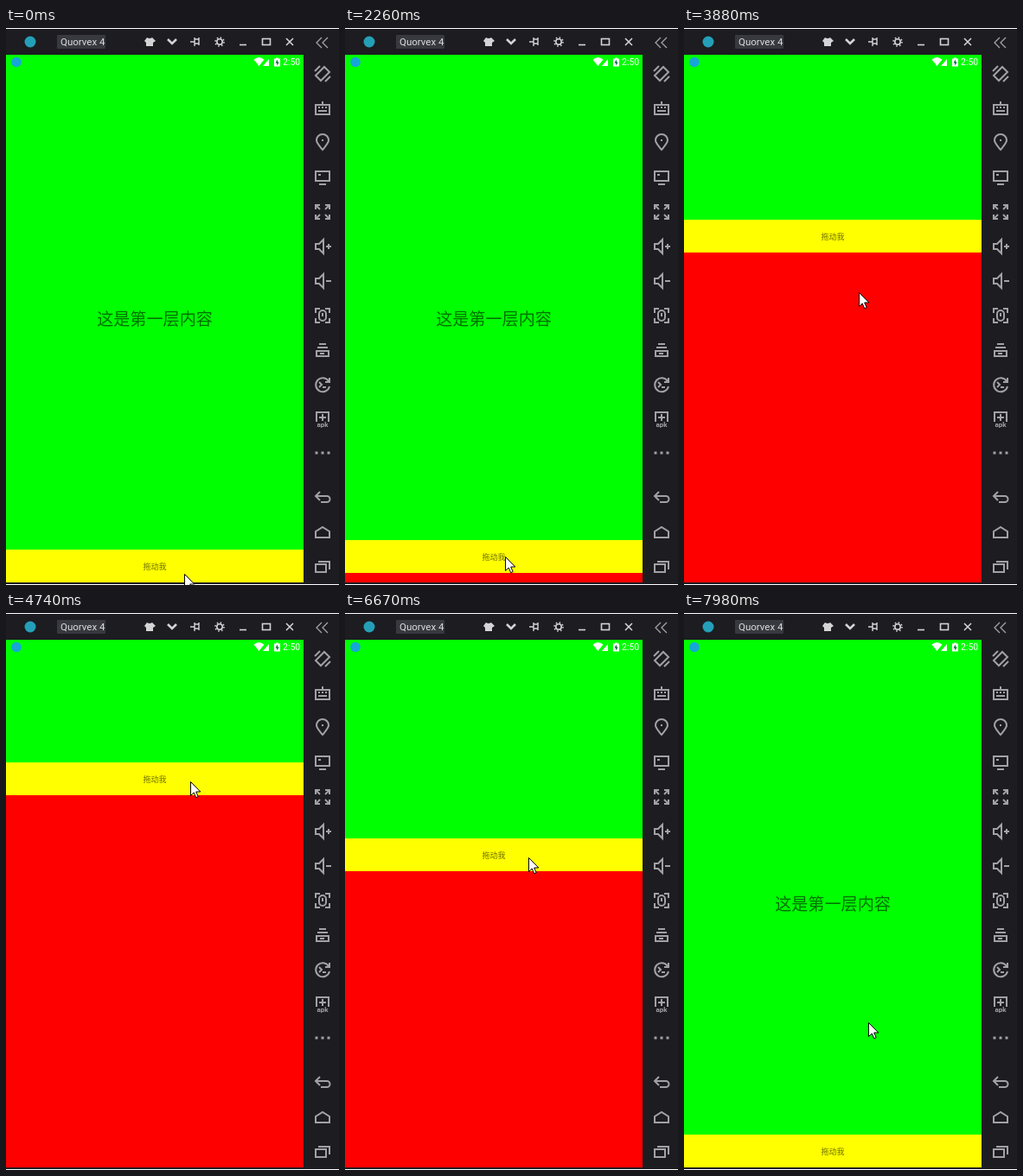
Write an HTML page that moves like this. It is 385 by 645 pixels and loops after 8 s.

```html
<!DOCTYPE html>
<html lang="zh-CN">
<head>
<meta charset="utf-8">
<style>
html, body { margin: 0; width: 100%; height: 100%; overflow: hidden; background: #fff; }
svg { display: block; }
.zh { font-family: "Noto Sans CJK SC", "Noto Sans CJK", sans-serif; fill: #000; fill-opacity: .56; text-anchor: middle; }
.ui { font-family: Roboto, sans-serif; }
.line { fill: none; stroke: #a2a2a6; stroke-width: 2; }
.title { fill: none; stroke: #d4d4d6; stroke-width: 1.6; }
</style>
</head>
<body>
<svg width="385" height="645" viewBox="0 0 385 645">
  <rect y="1" width="385" height="643" fill="#1c1c21"/>

  <circle cx="28" cy="16" r="6.5" fill="#259fb8"/>
  <rect x="59" y="8" width="56" height="16" rx="1" fill="#38393f"/>
  <text class="ui" x="63" y="20" font-size="11.5" fill="#dcdcde">Quorvex 4</text>
  <g class="title">
    <path fill="#d4d4d6" stroke="none" d="M163 11q3 2 6 0l4 4-3 2v4h-8v-4l-2-2z"/>
    <path stroke-width="2.6" d="M187 13l5 5 5-5"/>
    <path stroke-width="1.4" d="M213 16h5m0-5v10m0-8h5v5h-5m5-7v9"/>
    <circle cx="247" cy="16" r="3.2"/>
    <circle cx="247" cy="16" r="5" stroke-dasharray="1.6 2.327"/>
    <path d="M270 19.5h8"/>
    <rect x="296.500" y="12.500" width="9" height="7"/>
    <path d="M324 12l8 8m0-8l-8 8"/>
    <path stroke="#a2a2a6" stroke-width="1.3" d="M365 11l-6 6 6 6m7-12l-6 6 6 6"/>
  </g>

  <defs>
    <path id="speaker" d="M-8-3h4l5-5v16l-5-5h-4zM4 0h6"/>
    <path id="corner" d="M-8-3v-5h5"/>
    <g id="corners">
      <use href="#corner"/>
      <use href="#corner" transform="rotate(90)"/>
      <use href="#corner" transform="rotate(180)"/>
      <use href="#corner" transform="rotate(270)"/>
    </g>
  </defs>
  <g class="line" transform="translate(366)">
    <path transform="translate(0 53)" d="M2-8l6 6L-2 8l-6-6zM-9-3l6-6M3 9l6-6"/>
    <path transform="translate(0 93)" d="M-8-4H8V7H-8zM0-4v-4M-5 3H5"/>
    <path transform="translate(0 93)" stroke-dasharray="2" d="M-5-1H5"/>
    <path transform="translate(0 132)" d="M0 9C-4 4-7 1-7-2a7 7 0 0 1 14 0C7 1 4 4 0 9zM-1-2h2"/>
    <path transform="translate(0 173)" d="M-8-7H8V4H-8zM-4 8h8M-5-3h3"/>
    <use href="#corners" y="213"/>
    <path transform="translate(0 213)" stroke-dasharray="7 8.500" d="M-8-8L8 8M8-8L-8 8"/>
    <use href="#speaker" y="253"/>
    <path d="M7 250v6"/>
    <use href="#speaker" y="293"/>
    <use href="#corners" y="333"/>
    <rect x="-4" y="327" width="8" height="12" rx="4"/>
    <path d="M0 330v4"/>
    <path transform="translate(0 373)" d="M-4-7h8M-6-3H6M-7 1H7v6H-7zM-3 4h5"/>
    <path transform="translate(0 413)" d="M7-4a8 8 0 1 0 1 6M8-8v5H3M-4-3l3 3-3 3M0 3h4"/>
    <path transform="translate(0 453)" d="M-7 3V-8H7V3M0-6v8M-4-2h8"/>
    <path stroke-width="3" stroke-dasharray="3 4" d="M-8.500 492h17"/>
    <path transform="translate(0 543)" d="M-3-6l-5 5 5 5M-8-1H5a3.500 3.500 0 0 1 0 7h-7"/>
    <path transform="translate(0 584)" d="M-8 6v-7l8-5 8 5v7z"/>
    <path transform="translate(0 624)" d="M-8-3H4v9H-8zM-5-6H8v9"/>
  </g>
  <text class="ui" x="366" y="462" font-size="8" font-weight="700" fill="#a2a2a6" text-anchor="middle">apk</text>

  <rect y="31" width="344" height="611" fill="#0f0"/>
  <circle cx="12" cy="39.5" r="5.8" fill="#16a6d8"/>
  <g fill="#fff">
    <path d="M286.500 36.500q6-5 12 0l-6 7.500z"/>
    <path d="M304 36v8h-7z"/>
    <path d="M310 35.500h2v-1h3v1h2v9h-7z"/>
    <path fill="#063" d="M314 36.500l-2.500 4h1.700v3l2.500-4H314z"/>
    <text class="ui" x="320" y="43" font-size="10.5">2:50</text>
  </g>
  <text class="zh" x="172" y="344" font-size="19.1">这是第一层内容</text>

  <svg width="344" height="642">
    <g id="sheet">
      <rect width="344" height="642" fill="#f00"/>
      <rect width="344" height="38" fill="#ff0"/>
      <text class="zh" x="172" y="22.5" font-size="9">拖动我</text>
    </g>
  </svg>
  <path id="cursor" d="M.5.5v16L4.200 13l2.500 5.700 2.500-1.100L6.700 12h5.100z" fill="#fff" stroke="#000"/>
</svg>
<script>
const $ = id => document.getElementById(id);
const STEP = 78;
const CLOSED = 604, OPEN = 222;

// Each move: first step ms, last step ms, then the values it ends on
const cursorMoves = [
  [0, 0, 206, 632],
  [70, 315, 179, 610],
  [397, 560, 180, 621],
  [940, 1020, 180, 617],
  [1550, 1710, 185, 623],
  [2030, 2260, 185, 612],
  [2720, 2880, 186, 625],
  [3110, 3110, 192, 553],
  [3180, 3180, 197, 499],
  [3410, 3580, 201, 327],
  [3880, 4130, 203, 244],
  [4510, 4740, 213, 195],
  [5140, 5200, 208, 234],
  [5430, 5820, 208, 263],
  [6050, 6130, 209, 270],
  [6280, 6430, 210, 256],
  [6600, 6680, 213, 310],
  [6750, 6830, 221, 414],
  [6906, 7360, 201, 603],
  [7440, 7520, 200, 622],
  [7760, 7980, 213, 474]
];
const sheetMoves = [
  [0, 0, CLOSED],
  [940, 1020, 600],
  [1480, 1480, CLOSED],
  [2030, 2260, 593],
  [2570, 2570, CLOSED],
  [3110, 3110, 573],
  [3180, 3180, OPEN],
  [4510, 4740, 173],
  [4900, 4970, OPEN],
  [5430, 5820, 251],
  [5970, 5970, OPEN],
  [6600, 6680, 300],
  [6750, 6830, CLOSED],
  [7840, 7840, 596],
  [7910, 7910, CLOSED]
];

function valuesAt(moves, t) {
  const i = moves.findLastIndex(m => m[0] <= t);
  const [start, end, ...to] = moves[i];
  const gaps = Math.round((end - start) / STEP);
  if (!gaps) return to;
  const done = Math.floor((t - start) / (end - start) * gaps + 1e-6) + 1;
  const p = Math.min(1, done / (gaps + 1));
  const from = moves[i - 1].slice(2);
  return to.map((v, k) => Math.round(from[k] + (v - from[k]) * p));
}

function draw() {
  const t = performance.now() % 8000;
  const [x, y] = valuesAt(cursorMoves, t);
  const [top] = valuesAt(sheetMoves, t);
  $("cursor").setAttribute("transform", `translate(${x} ${y})`);
  $("sheet").setAttribute("transform", `translate(0 ${top})`);
  requestAnimationFrame(draw);
}
draw();
</script>
</body>
</html>
```
